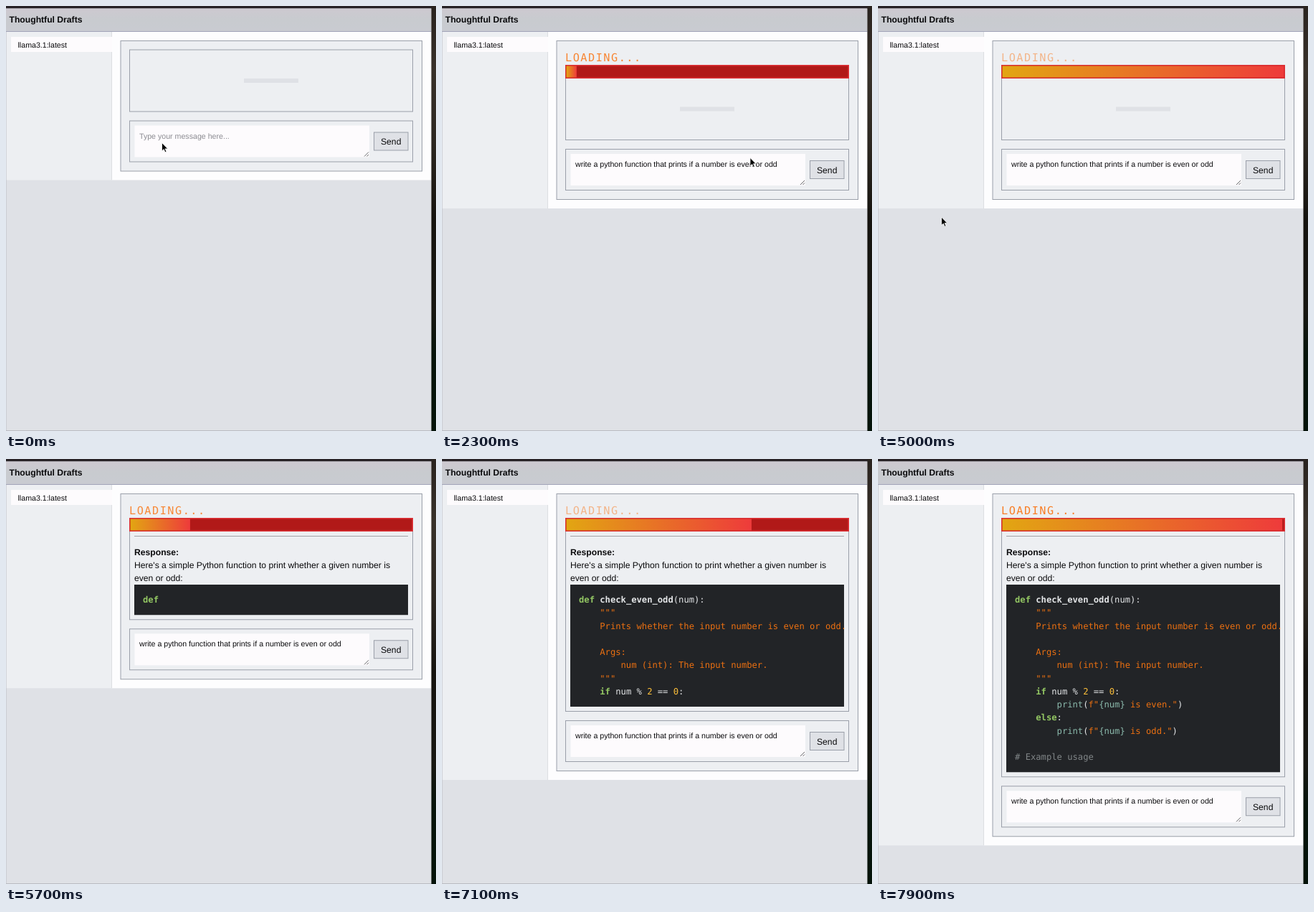
An HTML page that plays this animation: 600x592 px, repeating every 8 s.

```html
<!DOCTYPE html>
<html lang="en">
<head>
<meta charset="utf-8">
<title>Chat prompt</title>
<style>
  html, body { margin: 0; width: 100%; height: 100%; overflow: hidden; background: #dfe1e6; }
  svg { display: block; width: 100%; height: 100%; }
  text { font: 12.16px "Liberation Sans", Arial, sans-serif; fill: #0a0a0c; white-space: pre; text-rendering: geometricPrecision; }
  .small { font-size: 10.64px; }
  .bold { font-weight: bold; }
  .hint { fill: #8b8b91; }
  .frame { fill: none; stroke: #9a9fa9; }
  .code, .code tspan { font-family: "DejaVu Sans Mono", monospace; }
  .code { fill: #e4e6e8; }
  .key { fill: #93c763; font-weight: bold; }
  .title { font-weight: bold; }
  .str { fill: #ec7011; }
  .num { fill: #ffc13a; }
  .call { fill: #8cbbad; }
  .note { fill: #818688; }
  #loadingText { font: 15.2px "DejaVu Sans Mono", monospace; letter-spacing: 1.52px; fill: #f97c22; }
</style>
</head>
<body>
<svg viewBox="0 0 600 592">
  <defs>
    <linearGradient id="headerFill" x2="0" y2="1">
      <stop stop-color="#cdc9d0"/><stop offset=".5" stop-color="#c8cbcf"/><stop offset="1" stop-color="#c9cbd1"/>
    </linearGradient>
    <linearGradient id="barFill">
      <stop stop-color="#e2a612"/><stop offset="1" stop-color="#ee3b3b"/>
    </linearGradient>
    <linearGradient id="wallpaper" x2="0" y2="1">
      <stop stop-color="#29231f"/><stop offset=".15" stop-color="#38312a"/><stop offset=".32" stop-color="#2c2721"/>
      <stop offset=".5" stop-color="#15130f"/><stop offset=".72" stop-color="#171712"/>
      <stop offset=".82" stop-color="#06140b"/><stop offset="1" stop-color="#04130a"/>
    </linearGradient>
    <clipPath id="codeClip"><rect x="179" y="175" width="382.5" height="417"/></clipPath>
  </defs>

  <rect width="600" height="592" fill="#dfe1e6"/>
  <rect width="600" height="3.5" fill="#272226"/>
  <rect y="3.5" width="593.5" height="31.5" fill="url(#headerFill)"/>
  <rect y="35" width="593.5" height="1" fill="#a1a4b8"/>
  <text class="bold" x="4.5" y="23">Thoughtful Drafts</text>

  <rect id="sidebar" y="36" width="148" fill="#edeff2"/>
  <rect id="panel" x="147.5" y="36" width="446" fill="#fdfdfe"/>
  <rect id="divider" x="147" y="36" width="1" fill="#dcdee2"/>
  <rect x="7" y="43" width="141" height="21" fill="#fdfbfd"/>
  <text class="small" x="16.5" y="57.5">llama3.1:latest</text>

  <rect id="card" class="frame" x="160" y="48.5" width="420.5" style="fill:#edeff2"/>
  <rect id="chat" class="frame" x="172.5" width="395"/>

  <g id="loading">
    <text id="loadingText" x="172" y="77">LOADING...</text>
    <rect x="172" y="82" width="396" height="19" fill="#de2f35"/>
    <rect x="173.5" y="83.5" width="393" height="16" fill="#b11918"/>
    <rect id="bar" x="173.5" y="83.5" height="16" fill="url(#barFill)"/>
  </g>

  <g id="response">
    <path d="M179 107.5H561" stroke="#a2a3a8"/>
    <text class="bold" x="179" y="133.5">Response:</text>
    <g id="prose"></g>
    <rect id="codeBox" x="179" y="175" width="382" fill="#222427"/>
    <g id="code" clip-path="url(#codeClip)"></g>
  </g>

  <g id="form">
    <rect id="skeleton" x="332" y="101" width="76" height="6" fill="#dfe1e6"/>
    <rect class="frame" x="172.5" y="160" width="395" height="57"/>
    <rect id="field" x="179.5" y="166.5" width="327.5" height="44" fill="#fdfbfd"/>
    <path d="M500 209.5L506 203.5M503.5 209.5L506 207" stroke="#55565a" stroke-width=".9"/>
    <text id="message" class="small" x="186" y="184.5"></text>
    <path id="caret" d="M468.5 175V187" stroke="#0a0a0c"/>
    <rect id="send" class="frame" x="513.5" y="176" width="47.5" height="25"/>
    <text x="523" y="193">Send</text>
  </g>

  <rect x=".25" y="36" width=".5" height="556" fill="#b9bbc2"/>
  <rect y="591" width="594" height="1" fill="#b9bbc2"/>
  <rect x="593.5" width="6.5" height="592" fill="url(#wallpaper)"/>
  <path id="pointer" d="M0 0V11.5L2.7 9.1L4.5 13.2L6.4 12.4L4.6 8.4H8.2Z" fill="#050505" stroke="#fff" stroke-width=".8"/>
</svg>
<script>
const LOOP = 8000, STEP = 100, LINE = 18.25;
const FOCUS_AT = 300, PASTE_AT = 1000, SEND_AT = 2016, REPLY_AT = 5100;
const PROMPT = 'write a python function that prints if a number is even or odd';
const PROSE = "Here's a simple Python function to print whether a given number is\neven or odd:\n";
const CODE = `def check_even_odd(num):
    """
    Prints whether the input number is even or odd.

    Args:
        num (int): The input number.
    """
    if num % 2 == 0:
        print(f"{num} is even.")
    else:
        print(f"{num} is odd.")

# Example usage`;
const REPLY = PROSE + CODE;
const endOf = part => REPLY.indexOf(part) + part.length;

// [time, value] keys
const typed = [[REPLY_AT, 0], [6300, endOf('odd.\n')], [7100, endOf('== 0:')], [7900, REPLY.length]];
const pointerX = [[1000, 217.5], [1400, 533], [2100, 533], [2700, 88.5]];
const pointerY = [[1000, 190.5], [1400, 186.5], [2100, 186.5], [2700, 294]];

const $ = id => document.getElementById(id);
const set = (id, attrs) => { for (const k in attrs) $(id).setAttribute(k, attrs[k]); };
const show = (id, on) => set(id, { visibility: on ? 'visible' : 'hidden' });

// Cubic bezier easing with control points (x1, 0) and (x2, 1)
function ease(u, x1, x2) {
  let lo = 0, hi = 1;
  for (let i = 0; i < 20; i++) {
    const s = (lo + hi) / 2, r = 1 - s;
    if (3 * r * r * s * x1 + 3 * r * s * s * x2 + s ** 3 < u) lo = s; else hi = s;
  }
  return 3 * lo * lo - 2 * lo ** 3;
}
const easeInOut = u => ease(u, .42, .58);

function track(keys, t, curve = u => u) {
  if (t <= keys[0][0]) return keys[0][1];
  for (let i = 1; i < keys.length; i++) {
    const [t0, a] = keys[i - 1], [t1, b] = keys[i];
    if (t <= t1) return a + (b - a) * curve((t - t0) / (t1 - t0));
  }
  return keys[keys.length - 1][1];
}

const span = (cls, s) => `<tspan class="${cls}">${s}</tspan>`;

function highlight(line, index) {
  if (index > 0 && index < 7) return span('str', line);
  return line.replace(/(#.*)|(f"[^"]*"?)|\b(def|if|else)\b|(check\w*)|(print)|(\d)/g,
    (s, note, str, key, title, call, num) =>
      note ? span('note', s) :
      str ? span('str', s.replace(/{\w*}?/, v => span('call', v))) :
      key ? span('key', s) : title ? span('title', s) : call ? span('call', s) : span('num', s));
}

const textLines = (lines, cls, x, y, format = s => s) => lines.map((s, i) =>
  `<text class="${cls}" x="${x}" y="${y + i * LINE}">${format(s, i)}</text>`).join('');

// Draws the part of the reply streamed so far and returns its lower edge
function drawReply(t) {
  const text = REPLY.slice(0, Math.round(track(typed, t)));
  const prose = text.slice(0, PROSE.length).trimEnd().split('\n');
  const code = text.slice(PROSE.length);
  const lines = code.split('\n');
  const height = code ? 24 + lines.length * LINE : 0;
  $('prose').innerHTML = textLines(prose, '', 179, 151.75);
  $('code').innerHTML = code ? textLines(lines, 'code', 191, 200, highlight) : '';
  set('codeBox', { height });
  return code ? 175 + height : 138.5 + prose.length * LINE;
}

function render(t) {
  const loading = t >= SEND_AT, replying = t > REPLY_AT;
  const focused = t >= FOCUS_AT && !loading, pasted = t >= PASTE_AT;
  const top = loading ? 100.5 : 61;
  let bottom = top + 86;

  show('loading', loading);
  if (loading) {
    const age = t - SEND_AT;
    const half = age % 3000 / 1500, step = Math.floor(half);
    const pulse = age % 2000 / 1000;
    set('bar', { width: 393 * (step + easeInOut(half - step)) / 2 });
    set('loadingText', { opacity: 1 - ease(pulse < 1 ? pulse : 2 - pulse, .4, .6) / 2 });
  }

  set('response', { display: replying ? 'inline' : 'none' });
  if (replying) bottom = drawReply(t) + 6.5;
  show('skeleton', !replying);

  const shift = bottom - 147;
  set('chat', { y: top, height: bottom - top });
  set('card', { height: 181.5 + shift });
  for (const id of ['sidebar', 'panel', 'divider']) set(id, { height: 206.5 + shift });
  set('form', { transform: `translate(0 ${shift})` });

  set('field', { stroke: focused ? '#35363c' : 'none' });
  $('message').textContent = pasted ? PROMPT : 'Type your message here...';
  set('message', { class: pasted ? 'small' : 'small hint' });
  show('caret', focused);
  set('caret', { transform: `translate(${pasted ? 0 : -282} 0)` });

  const x = track(pointerX, t, easeInOut), y = track(pointerY, t, easeInOut);
  const hover = !loading && x > 513 && y > 176;
  set('send', { style: `fill:${hover ? '#c8cbd1' : '#dfe1e6'}` });
  set('pointer', { transform: `translate(${x} ${y})` });
  show('pointer', t < REPLY_AT + 100);
}

const start = performance.now();
function tick() {
  const t = (performance.now() - start) % LOOP;
  render(Math.floor(t / STEP) * STEP);
  requestAnimationFrame(tick);
}
tick();
</script>
</body>
</html>
```
